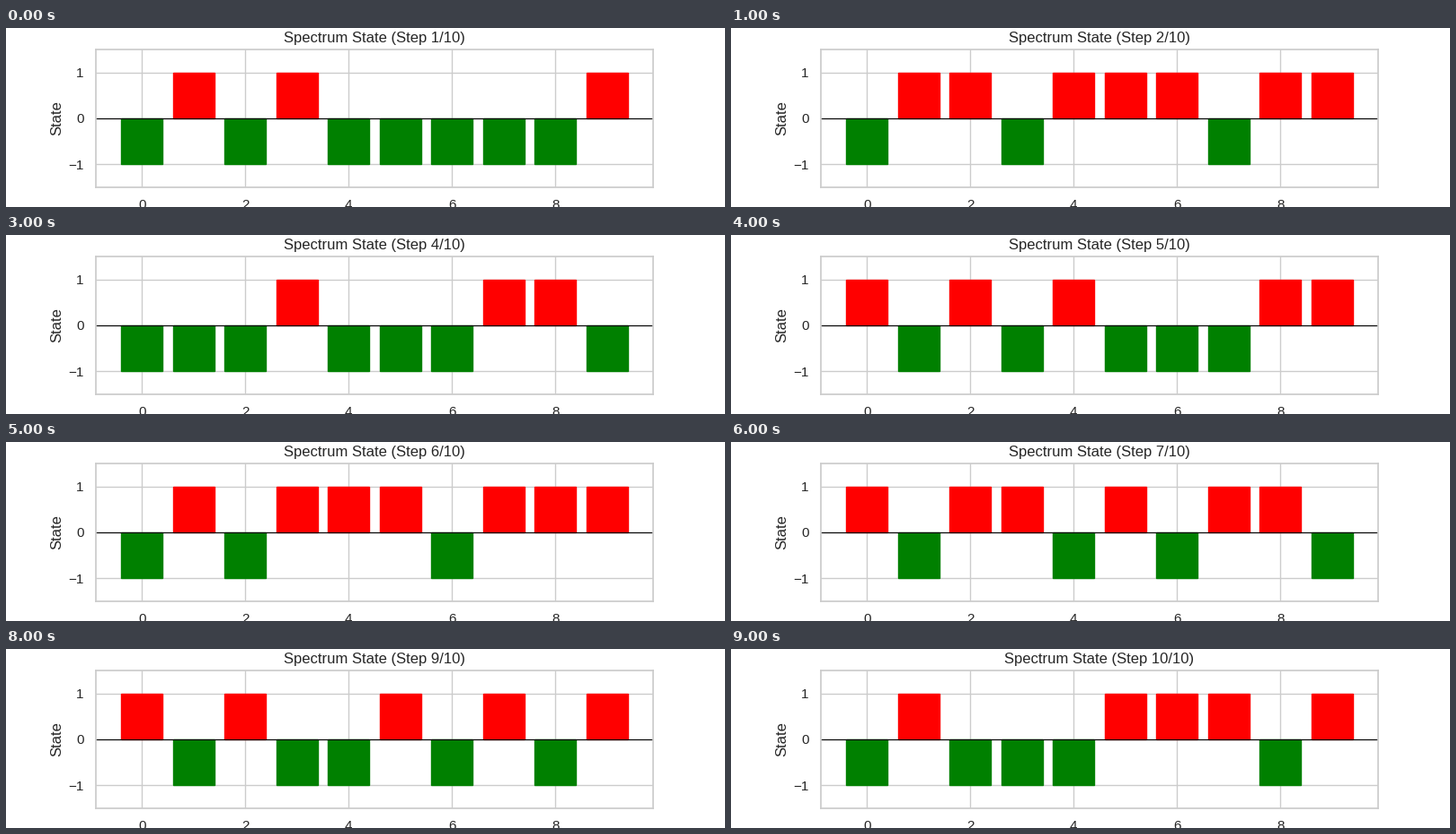
Animation of 800 by 200 pixels, one loop 10 s. Source, as a matplotlib script:

```python
import matplotlib.pyplot as plt
from matplotlib.animation import FuncAnimation

plt.rcParams.update({
    "font.family": "Liberation Sans",
    "text.color": ".15",
    "axes.labelcolor": ".15",
    "xtick.color": ".15",
    "ytick.color": ".15",
    "axes.edgecolor": ".8",
    "axes.linewidth": 1.25,
    "axes.axisbelow": True,
    "grid.color": ".8",
    "grid.linewidth": 1,
    "lines.solid_capstyle": "round",
})

# One row per step: 1 is an occupied channel, 0 a free one
STEPS = [
    "0101000001",
    "0110111011",
    "1100011000",
    "0001000110",
    "1010100011",
    "0101110111",
    "1011010110",
    "0011011100",
    "1010010101",
    "0100011101",
]
CHANNELS = len(STEPS[0])

fig, ax = plt.subplots(figsize=(8, 2), dpi=100)


def draw(step):
    ax.clear()
    states = [1 if c == "1" else -1 for c in STEPS[step]]
    colors = ["red" if s > 0 else "green" for s in states]
    ax.bar(range(CHANNELS), states, color=colors, linewidth=1, edgecolor=colors)
    ax.axhline(0, color="black", linewidth=0.8)
    ax.set_xlim(-0.89, 9.89)
    ax.set_ylim(-1.5, 1.5)
    ax.set_xticks(range(0, CHANNELS, 2))
    ax.set_yticks([-1, 0, 1])
    ax.tick_params(left=False, bottom=False, length=6, pad=3.5, labelsize=11)
    ax.grid(True)
    ax.set_ylabel("State", fontsize=12)
    ax.set_title(f"Spectrum State (Step {step + 1}/{len(STEPS)})", fontsize=12)


anim = FuncAnimation(fig, draw, frames=len(STEPS), init_func=lambda: draw(0),
                     interval=1000, repeat=True, repeat_delay=0)
plt.show()
```
